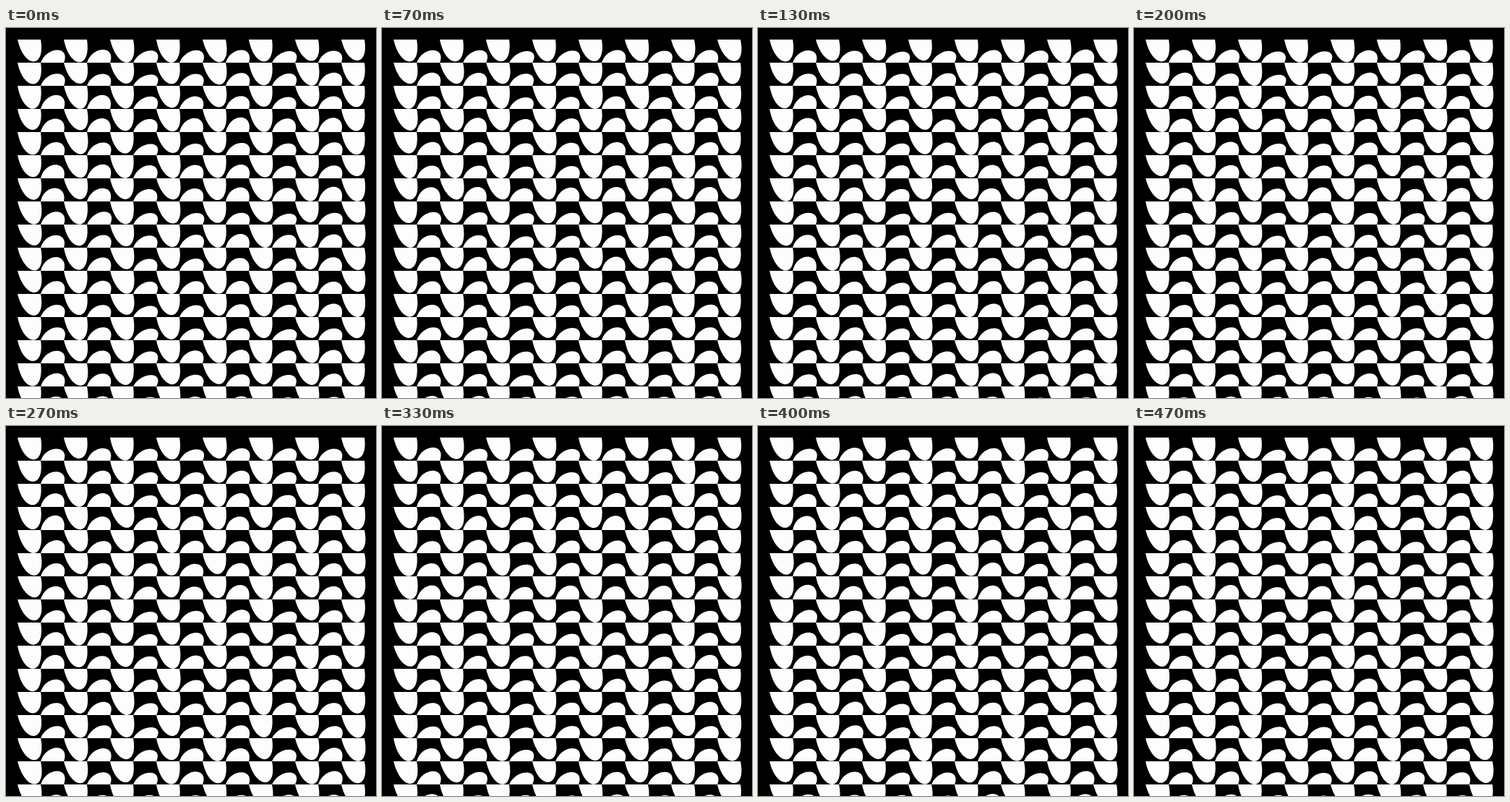
Recreate the animation shown at these times as an HTML page without scripts. Size 512x512 px, loop 0.54 s.

```html
<!DOCTYPE html>
<html lang="en">
<head>
<meta charset="utf-8">
<title>Cups and bumps</title>
<style>
@property --t { syntax: "<number>"; inherits: true; initial-value: 0; }

html, body { margin: 0; width: 100%; height: 100%; overflow: hidden; background: #000; }

main {
  position: relative;
  width: 512px;
  height: 512px;
  overflow: hidden;
  animation: tick 540ms step-end infinite;
}

p {
  position: absolute;
  left: 16px;
  top: calc(16px + 32px * var(--r));
  margin: 0;
}

/* Each shape hangs from its flat edge; height and lean wobble with every tick. */
i {
  --p: calc((var(--r) * 12.9 + var(--c) * 78.2) * (var(--t) + 3.7));
  --grow: calc(1 + .05 * sin(var(--p)));
  --sway: calc(2.4deg * sin(var(--p) * 1.7));
  position: absolute;
  left: calc(32px * var(--c));
  top: 0;
  width: 56px;
  height: 56px;
  background: #fdfdfd;
  clip-path: path("M0 0C9 40.5 39 40.5 32 0Z");
  transform-origin: 0 0;
  transform: scaleY(var(--grow)) skewX(var(--sway));
}

/* Bumps are flipped upwards from the bottom of the row; low ones lean further. */
i:nth-child(even) {
  --tilt: calc(var(--lean) + 50deg * (1.03 - var(--h)));
  top: 32px;
  clip-path: path("M0 0C7 24 40 24 32 0Z");
  transform: scaleY(calc(-1 * var(--h) * var(--k, 1) * var(--grow))) skewX(calc(var(--tilt) + var(--sway)));
}

i:nth-child(1) { --c: 0; }
i:nth-child(2) { --c: 1; --lean: -2deg; }
i:nth-child(3) { --c: 2; }
i:nth-child(4) { --c: 3; --lean: 0deg; }
i:nth-child(5) { --c: 4; }
i:nth-child(6) { --c: 5; --lean: 4deg; --k: .92; }
i:nth-child(7) { --c: 6; }
i:nth-child(8) { --c: 7; --lean: 2deg; --k: .96; }
i:nth-child(9) { --c: 8; }
i:nth-child(10) { --c: 9; --lean: -3deg; }
i:nth-child(11) { --c: 10; }
i:nth-child(12) { --c: 11; --lean: 3deg; --k: .94; }
i:nth-child(13) { --c: 12; }
i:nth-child(14) { --c: 13; --lean: -1deg; }
i:nth-child(15) { --c: 14; }

p:nth-child(1) { --r: 0; --h: .96; }
p:nth-child(2) { --r: 1; --h: .97; }
p:nth-child(3) { --r: 2; --h: 1.02; }
p:nth-child(4) { --r: 3; --h: 1.07; }
p:nth-child(5) { --r: 4; --h: .98; }
p:nth-child(6) { --r: 5; --h: 1.03; }
p:nth-child(7) { --r: 6; --h: 1.07; }
p:nth-child(8) { --r: 7; --h: .94; }
p:nth-child(9) { --r: 8; --h: 1; }
p:nth-child(10) { --r: 9; --h: 1.03; }
p:nth-child(11) { --r: 10; --h: .98; }
p:nth-child(12) { --r: 11; --h: .98; }
p:nth-child(13) { --r: 12; --h: .94; }
p:nth-child(14) { --r: 13; --h: 1; }
p:nth-child(15) { --r: 14; --h: .98; }
p:nth-child(16) { --r: 15; --h: 1; }

@keyframes tick {
  0% { --t: 0; }
  12.96% { --t: 1; }
  24.07% { --t: 2; }
  37.03% { --t: 3; }
  50% { --t: 4; }
  61.11% { --t: 5; }
  74.07% { --t: 6; }
  87.03%, 100% { --t: 7; }
}
</style>
</head>
<body>
<main>
<p><i></i><i></i><i></i><i></i><i></i><i></i><i></i><i></i><i></i><i></i><i></i><i></i><i></i><i></i><i></i></p>
<p><i></i><i></i><i></i><i></i><i></i><i></i><i></i><i></i><i></i><i></i><i></i><i></i><i></i><i></i><i></i></p>
<p><i></i><i></i><i></i><i></i><i></i><i></i><i></i><i></i><i></i><i></i><i></i><i></i><i></i><i></i><i></i></p>
<p><i></i><i></i><i></i><i></i><i></i><i></i><i></i><i></i><i></i><i></i><i></i><i></i><i></i><i></i><i></i></p>
<p><i></i><i></i><i></i><i></i><i></i><i></i><i></i><i></i><i></i><i></i><i></i><i></i><i></i><i></i><i></i></p>
<p><i></i><i></i><i></i><i></i><i></i><i></i><i></i><i></i><i></i><i></i><i></i><i></i><i></i><i></i><i></i></p>
<p><i></i><i></i><i></i><i></i><i></i><i></i><i></i><i></i><i></i><i></i><i></i><i></i><i></i><i></i><i></i></p>
<p><i></i><i></i><i></i><i></i><i></i><i></i><i></i><i></i><i></i><i></i><i></i><i></i><i></i><i></i><i></i></p>
<p><i></i><i></i><i></i><i></i><i></i><i></i><i></i><i></i><i></i><i></i><i></i><i></i><i></i><i></i><i></i></p>
<p><i></i><i></i><i></i><i></i><i></i><i></i><i></i><i></i><i></i><i></i><i></i><i></i><i></i><i></i><i></i></p>
<p><i></i><i></i><i></i><i></i><i></i><i></i><i></i><i></i><i></i><i></i><i></i><i></i><i></i><i></i><i></i></p>
<p><i></i><i></i><i></i><i></i><i></i><i></i><i></i><i></i><i></i><i></i><i></i><i></i><i></i><i></i><i></i></p>
<p><i></i><i></i><i></i><i></i><i></i><i></i><i></i><i></i><i></i><i></i><i></i><i></i><i></i><i></i><i></i></p>
<p><i></i><i></i><i></i><i></i><i></i><i></i><i></i><i></i><i></i><i></i><i></i><i></i><i></i><i></i><i></i></p>
<p><i></i><i></i><i></i><i></i><i></i><i></i><i></i><i></i><i></i><i></i><i></i><i></i><i></i><i></i><i></i></p>
<p><i></i><i></i><i></i><i></i><i></i><i></i><i></i><i></i><i></i><i></i><i></i><i></i><i></i><i></i><i></i></p>
</main>
</body>
</html>
```
